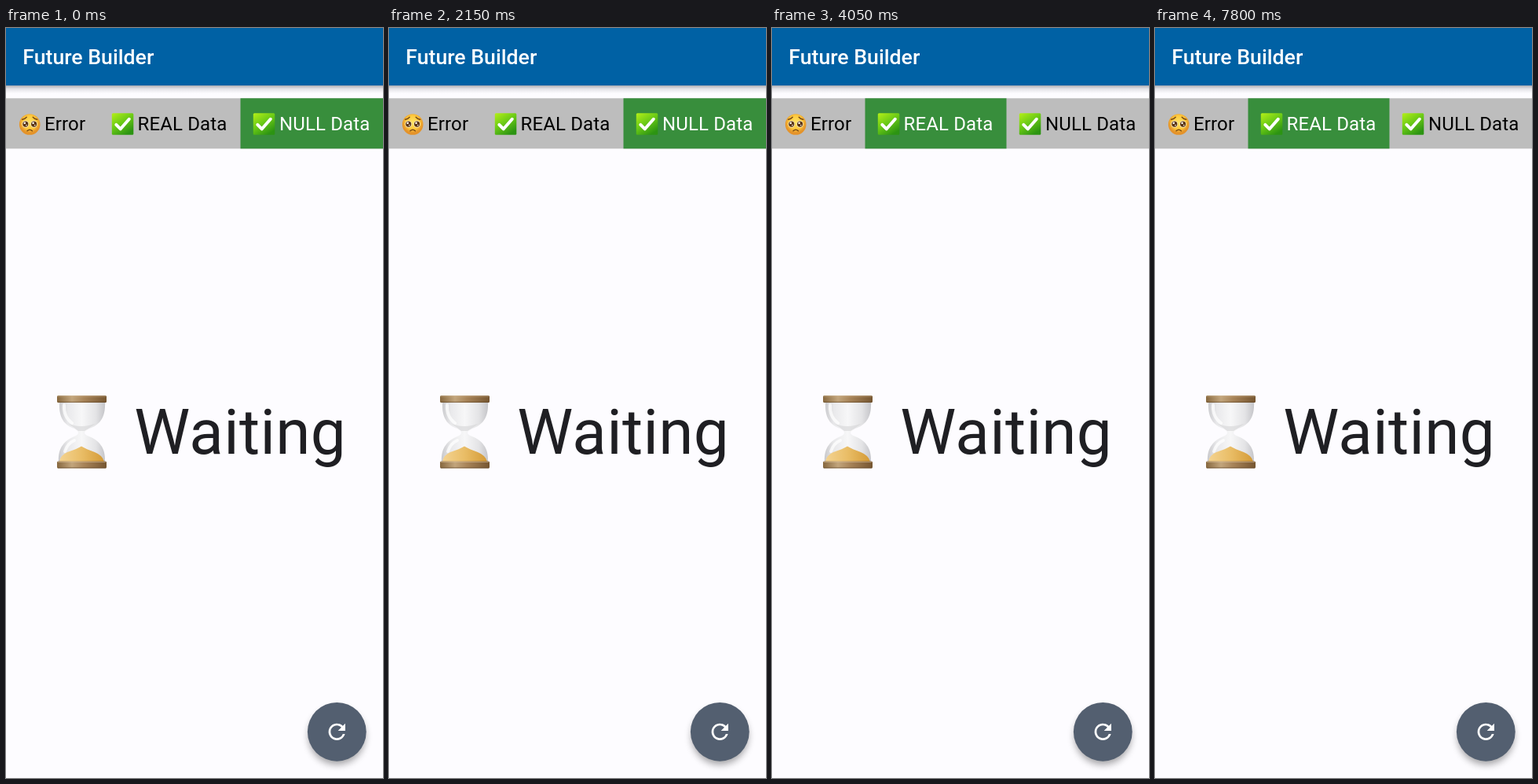
Write an HTML page that moves like this. It is 480 by 953 pixels and loops after 8000 ms.

```html
<!DOCTYPE html>
<html lang="en">
<head>
<meta charset="utf-8">
<title>Future Builder</title>
<style>
  html, body { margin: 0; width: 100%; height: 100%; overflow: hidden; background: #fdfcff; }
  svg { display: block; width: 100%; height: 100%; }
  text { font-family: Roboto, sans-serif; }
  .title { font-size: 26.67px; font-weight: 500; fill: #fff; }
  .label { font-size: 24px; letter-spacing: .13px; }
  .status { font-size: 80px; letter-spacing: .33px; fill: #1f1f23; }

  .null-tab, .real-tab, .null-label, .real-label, .waiting, .empty {
    animation: 8s step-end infinite;
  }
  .null-tab { animation-name: until-switch; }
  .real-tab { animation-name: after-switch; }
  .null-label { animation-name: to-black; }
  .real-label { animation-name: to-white; }
  .waiting { animation-name: waiting; }
  .empty { animation-name: empty; }

  @keyframes until-switch { 0% { opacity: 1 } 43.75%, 100% { opacity: 0 } }
  @keyframes after-switch { 0% { opacity: 0 } 43.75%, 100% { opacity: 1 } }
  @keyframes to-black { 0% { fill: #fff } 46.875%, 100% { fill: #000 } }
  @keyframes to-white { 0% { fill: #000 } 46.875%, 100% { fill: #fff } }
  @keyframes waiting { 0% { opacity: 1 } 36.875% { opacity: 0 } 43.75%, 100% { opacity: 1 } }
  @keyframes empty { 0% { opacity: 0 } 36.875% { opacity: 1 } 43.75%, 100% { opacity: 0 } }
</style>
</head>
<body>
<svg viewBox="0 0 480 953">
  <defs>
    <linearGradient id="barShadow" x2="0" y2="1">
      <stop stop-color="#8d8e96" stop-opacity=".75"/>
      <stop offset=".45" stop-color="#aaaab0" stop-opacity=".3"/>
      <stop offset="1" stop-color="#aaaab0" stop-opacity="0"/>
    </linearGradient>
    <linearGradient id="lime" x2=".65" y2="1">
      <stop stop-color="#b4ef18"/>
      <stop offset=".5" stop-color="#6ccb16"/>
      <stop offset="1" stop-color="#2c9412"/>
    </linearGradient>
    <radialGradient id="skin" cy=".4">
      <stop stop-color="#ffe566"/>
      <stop offset=".65" stop-color="#fdc83c"/>
      <stop offset="1" stop-color="#e4932a"/>
    </radialGradient>
    <linearGradient id="wood">
      <stop stop-color="#87683f"/>
      <stop offset=".3" stop-color="#c2a57c"/>
      <stop offset=".55" stop-color="#a78358"/>
      <stop offset="1" stop-color="#765631"/>
    </linearGradient>
    <linearGradient id="glass">
      <stop stop-color="#c9c9cc"/>
      <stop offset=".2" stop-color="#e9e9eb"/>
      <stop offset=".5" stop-color="#f7f7f8"/>
      <stop offset=".8" stop-color="#e4e4e6"/>
      <stop offset="1" stop-color="#c5c5c9"/>
    </linearGradient>
    <linearGradient id="sand">
      <stop stop-color="#f4d391"/>
      <stop offset=".5" stop-color="#e9bd66"/>
      <stop offset="1" stop-color="#d49a36"/>
    </linearGradient>
    <filter id="blur" x="-50%" y="-50%" width="200%" height="200%"><feGaussianBlur stdDeviation="5"/></filter>

    <g id="check">
      <rect width="27.5" height="27.5" rx="1.5" fill="url(#lime)"/>
      <path d="M5.5 14.5 11 20 22 7.5" fill="none" stroke="#fff" stroke-width="4" stroke-linecap="round" stroke-linejoin="round"/>
    </g>
    <g id="eye">
      <circle r="4.3" fill="#fff4d6"/>
      <circle r="3.6" fill="#5b3512"/>
      <circle cx="-1" cy="-1.3" r="1.3" fill="#fff"/>
      <circle cx="1.2" cy="1.5" r=".8" fill="#fff"/>
    </g>
    <g id="cap">
      <rect x="65" y="467" width="63" height="9" rx="1.5" fill="url(#wood)"/>
      <path d="M66 468h61" stroke="#d5bd98" stroke-opacity=".6"/>
      <path d="M66 475.3h61" stroke="#60452a" stroke-opacity=".65"/>
    </g>
  </defs>

  <rect width="480" height="953" fill="#fdfcff"/>
  <rect y="73" width="480" height="10" fill="url(#barShadow)"/>
  <rect width="480" height="73" fill="#0061a4"/>
  <text class="title" x="21.33" y="46">Future Builder</text>

  <rect y="89.3" width="480" height="64" fill="#bdbdbd"/>
  <rect class="real-tab" x="118.5" y="89.3" width="180" height="64" fill="#388e3c"/>
  <rect class="null-tab" x="298.5" y="89.3" width="181.5" height="64" fill="#388e3c"/>

  <g transform="translate(30.2 122.5)">
    <circle r="13.3" fill="url(#skin)"/>
    <use href="#eye" x="-5.4" y="-.4"/>
    <use href="#eye" x="5.4" y="-.4"/>
    <path d="M-9.5-6.2Q-5.8-7-4-9.3M9.5-6.2Q5.8-7 4-9.3M-3.2 8.3Q0 5.2 3.2 8.3" fill="none" stroke="#794a16" stroke-width="1.4" stroke-linecap="round"/>
  </g>
  <use href="#check" x="134.8" y="108.3"/>
  <use href="#check" x="314.8" y="108.3"/>
  <text class="label" x="49" y="130">Error</text>
  <text class="label real-label" x="167.6" y="130">REAL Data</text>
  <text class="label null-label" x="348" y="130">NULL Data</text>

  <g class="waiting">
    <path d="M68 476H126C127 496 118 505 106 509Q100 512 100 514Q100 517 106 519C118 524 127 533 126 551H67C66 533 75 524 87 519Q92 517 92 514Q92 512 87 509C75 505 67 496 68 476Z" fill="url(#glass)"/>
    <path d="M74 479Q73 494 84 502M75 538Q78 528 87 524" fill="none" stroke="#fff" stroke-width="4" stroke-linecap="round" opacity=".75"/>
    <path d="M78 502Q95 510 115 502Q107 508 100 512H92Q86 507 78 502Z" fill="#d5d5d8" opacity=".6"/>
    <path d="M68 551Q69 543 78 539Q90 535 96 531.5Q102 535 113 539Q123 543 125 551Z" fill="url(#sand)"/>
    <use href="#cap"/>
    <use href="#cap" y="83.5"/>
    <text class="status" x="163.3" y="541">Waiting</text>
  </g>
  <text class="status empty" x="98" y="541">No data</text>

  <circle cx="421.3" cy="900" r="36" fill="#000" opacity=".36" filter="url(#blur)"/>
  <circle cx="421.3" cy="894.3" r="37.4" fill="#535f70"/>
  <path transform="translate(405.3 878.3) scale(1.3333)" fill="#fff" d="M17.65 6.35A8 8 0 1 0 19.73 14H17.65A6 6 0 1 1 12 6C13.66 6 15.14 6.69 16.22 7.78L13 11H20V4Z"/>
</svg>
</body>
</html>
```
